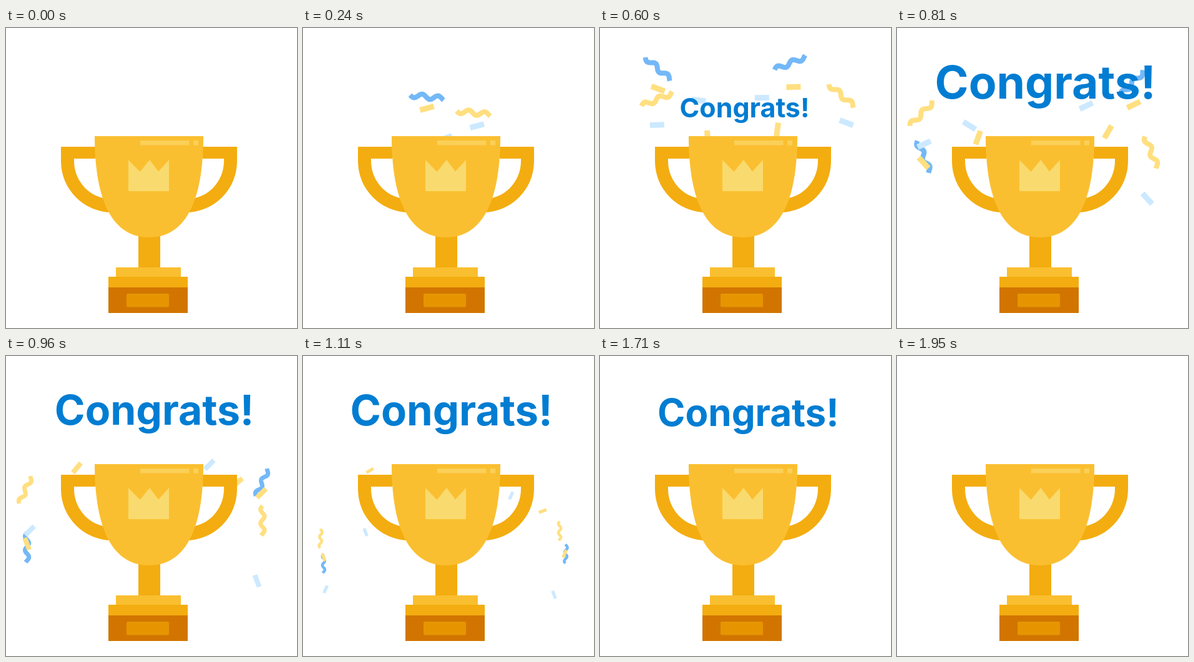
Animation of 466 by 480 pixels, one loop 2.25 s. Source, as an HTML page with a canvas:

```html
<!DOCTYPE html>
<html lang="en">
<head>
<meta charset="utf-8">
<title>Congrats</title>
<style>
html, body { margin: 0; width: 100%; height: 100%; overflow: hidden; background: #fff; }
canvas { display: block; }
</style>
</head>
<body>
<canvas id="stage" width="466" height="480"></canvas>
<script>
const ctx = document.getElementById('stage').getContext('2d');
const LOOP = 2250, STEP = 30;
const BLUE = '#73b8f7', YELLOW = '#ffdf80', PALE = '#cce9ff';
const GOLD = '#fabf30', AMBER = '#f3ad10', BROWN = '#d17500', PLATE = '#e69500';
const SHINE = '#fbd058', CROWN = '#f9da6e', INK = '#007dd2';

const clamp = v => Math.max(0, Math.min(1, v));
const part = (t, from, to) => clamp((t - from) / (to - from));
const mix = (a, b, u) => a + (b - a) * u;
const easeOut = (u, power) => 1 - (1 - u) ** power;
const smooth = u => u * u * (3 - 2 * u);
const easeCubic = u => u < .5 ? 4 * u ** 3 : 1 - 4 * (1 - u) ** 3;

const handle = new Path2D('M143 190H88V213A82 82 0 0 0 170 295V274A61 61 0 0 1 109 213V209H143Z');
const bowl = new Path2D('M142 173H316C316 268 292 335 229 335C166 335 142 268 142 173Z');
const crown = new Path2D('M196 211L214.5 230L230 211L244 229.5L261 211V261H196Z');
const wave = new Path2D();
for (let x = -27; x <= 27; x++) wave.lineTo(x, 3.6 * Math.sin((x + 27) / 25.5 * 2 * Math.PI));

// Confetti leaves the cup in bursts; every piece rises to a peak, then sinks to its end.
const MOUTH = { x: 229, y: 178 };
const START = 115, PEAK = 520, END = 1060;
const curl = (color, peak, end) => ({ color, peak, end, tilt: 0, curly: true });
const slip = (color, peak, end, tilt = -21) => ({ color, peak, end, tilt });
const bursts = [
  { delay: 0, turn: 1, pieces: [
    curl(BLUE, [130, 48], [33, 332]),
    curl(YELLOW, [372, 97], [411, 280]),
    slip(YELLOW, [130, 83], [33, 322]),
    slip(PALE, [390, 137], [402, 382])
  ] },
  { delay: 120, turn: 1, pieces: [
    slip(PALE, [150, 115], [100, 290])
  ] },
  { delay: 170, turn: -1, pieces: [
    curl(BLUE, [326, 50], [422, 355]),
    curl(YELLOW, [52, 111], [28, 318]),
    slip(PALE, [52, 154], [36, 405]),
    slip(YELLOW, [333, 90], [420, 349]),
    slip(PALE, [268, 108], [334, 240])
  ] },
  { delay: 220, turn: 1, pieces: [
    slip(YELLOW, [313, 161], [386, 275], 80),
    slip(YELLOW, [142, 175], [106, 186], 70)
  ] }
];

function drawPiece({ color, peak, end, tilt, curly }, turn, age, size) {
  const rise = part(age, START, PEAK), fall = part(age, PEAK, END);
  const x = mix(mix(MOUTH.x, peak[0], rise), end[0], easeOut(fall, 3));
  const y = mix(mix(MOUTH.y, peak[1], easeOut(rise, 2)), end[1], smooth(fall));
  const angle = tilt + 90 * part(age, START, 960) ** 1.4;
  ctx.save();
  ctx.translate(x, y);
  ctx.scale(size, size * turn);
  ctx.rotate(angle * Math.PI / 180);
  ctx.fillStyle = ctx.strokeStyle = color;
  ctx.lineWidth = 8;
  if (curly) ctx.stroke(wave);
  else ctx.fillRect(-11.5, -4.5, 23, 9);
  ctx.restore();
}

function drawConfetti(t) {
  const size = 1 - part(t, 900, 1380);
  if (!size) return;
  for (const { delay, turn, pieces } of bursts) {
    const age = t - delay;
    if (age > START) pieces.forEach(p => drawPiece(p, turn, age, size));
  }
}

function box(color, x, y, w, h) {
  ctx.fillStyle = color;
  ctx.fillRect(x, y, w, h);
}

function shape(color, path) {
  ctx.fillStyle = color;
  ctx.fill(path);
}

function drawCup() {
  shape(AMBER, handle);
  ctx.save();
  ctx.translate(458, 0);
  ctx.scale(-1, 1);
  shape(AMBER, handle);
  ctx.restore();
  box(AMBER, 212, 325, 35, 58);
  shape(GOLD, bowl);
  box(SHINE, 215, 180, 78.5, 7.5);
  box(SHINE, 300, 180, 8, 7.5);
  shape(CROWN, crown);
  box(GOLD, 176, 383, 104, 15);
  box(AMBER, 164, 398, 127, 17);
  box(BROWN, 164, 415, 127, 41);
  ctx.fillStyle = PLATE;
  ctx.beginPath();
  ctx.roundRect(193, 425, 68, 21.5, 2);
  ctx.fill();
}

function drawText(t) {
  // Grow past full size, settle, and shrink back into the cup.
  let size = 1.1 * smooth(part(t, 375, 780));
  size = mix(size, .985, smooth(part(t, 780, 960)));
  size = mix(size, 1, smooth(part(t, 960, 1110)));
  size *= 1 - smooth(part(t, 1650, 1950));
  if (size <= 0) return;
  const rise = smooth(part(t, 390, 730)), fall = easeCubic(part(t, 1650, 1950));
  ctx.save();
  ctx.translate(mix(mix(219, 237.5, rise), 230, fall), mix(mix(212, 85.5, rise), 212, fall));
  ctx.scale(size, size);
  ctx.font = '700 67px Inter, Arial, sans-serif';
  ctx.textAlign = 'center';
  ctx.fillStyle = INK;
  ctx.fillText('Congrats!', 0, 25);
  ctx.restore();
}

function frame(now) {
  const t = Math.floor(now % LOOP / STEP) * STEP;
  box('#fff', 0, 0, 466, 480);
  drawConfetti(t);
  drawCup();
  drawText(t);
  requestAnimationFrame(frame);
}
requestAnimationFrame(frame);
</script>
</body>
</html>
```
